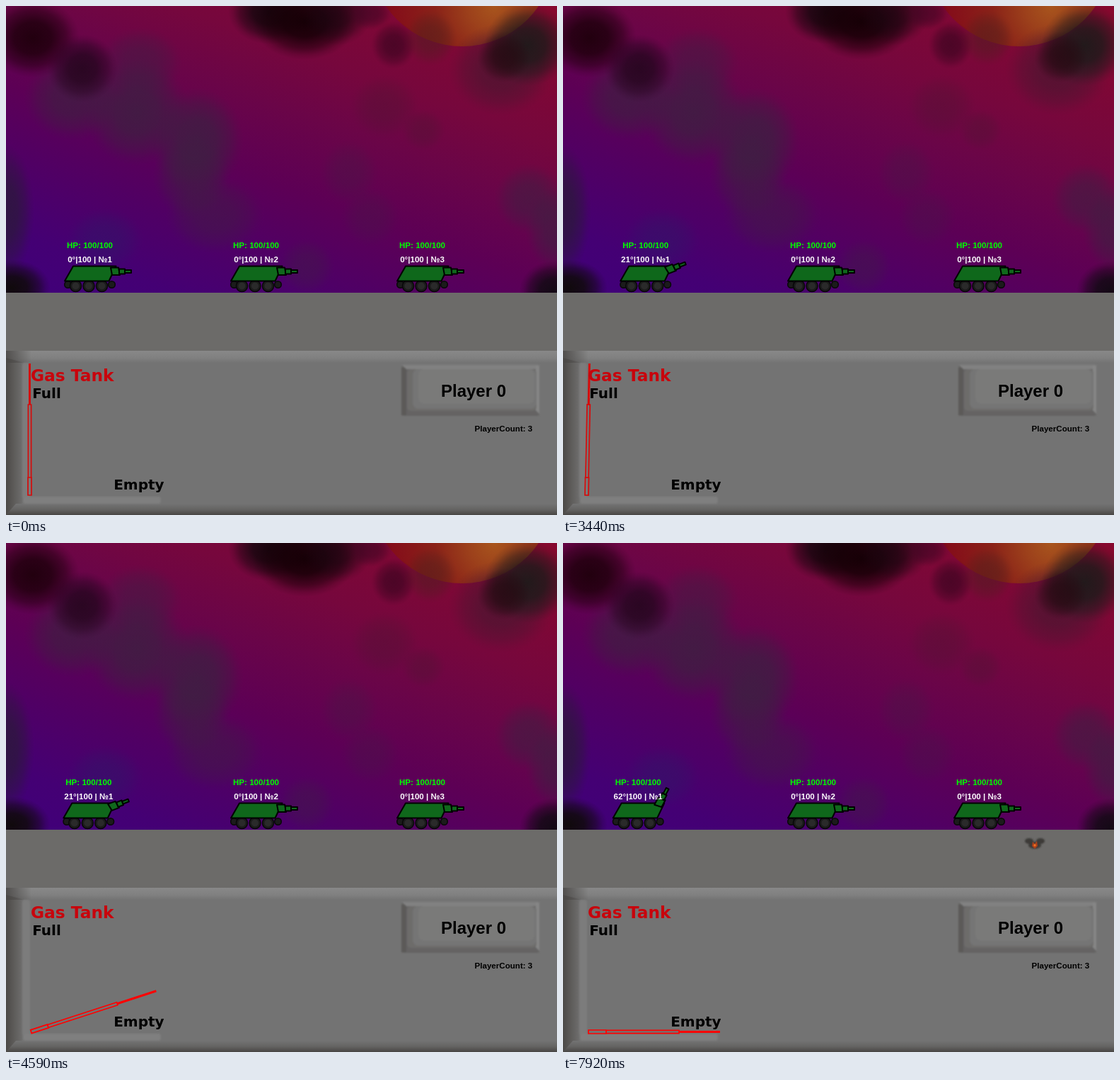
An HTML page with a canvas that plays this animation: 779 px wide and 719 px high, repeating every 8000 ms.

```html
<!DOCTYPE html>
<html lang="en">
<head>
<meta charset="utf-8">
<title>Tank duel</title>
<style>
  html, body { margin: 0; width: 100%; height: 100%; overflow: hidden; background: #6c6b69; }
  canvas, svg { position: absolute; left: 0; top: 0; display: block; }
  text { font: bold 11.6px "Liberation Sans", Arial, sans-serif; }
  .mid { text-anchor: middle; }
  .hp { fill: #0f0; }
  .info { fill: #fff; }
  .gauge { font: bold 20px "DejaVu Sans", sans-serif; }
  .hull { fill: #0f681b; stroke: #000; stroke-width: 2; stroke-linejoin: round; }
</style>
</head>
<body>
<canvas id="sky" width="779" height="405"></canvas>
<svg width="779" height="719" viewBox="0 0 779 719">
  <defs>
    <linearGradient id="left">
      <stop offset="0" stop-color="#4b4947"/><stop offset=".35" stop-color="#5a5856"/>
      <stop offset=".75" stop-color="#696867"/><stop offset="1" stop-color="#737373"/>
    </linearGradient>
    <linearGradient id="top" x2="0" y2="1">
      <stop offset="0" stop-color="#888"/><stop offset=".6" stop-color="#808080"/>
      <stop offset="1" stop-color="#737373"/>
    </linearGradient>
    <linearGradient id="bottom" x2="0" y2="1">
      <stop offset="0" stop-color="#737373"/><stop offset=".5" stop-color="#656463"/>
      <stop offset="1" stop-color="#484644"/>
    </linearGradient>
    <linearGradient id="corner" x2="1">
      <stop offset="0" stop-color="#4b4947" stop-opacity=".9"/>
      <stop offset="1" stop-color="#4b4947" stop-opacity="0"/>
    </linearGradient>
    <filter id="soft" x="-20%" y="-20%" width="140%" height="140%"><feGaussianBlur stdDeviation="1.2"/></filter>

    <g id="chassis">
      <g fill="#1b1b1b" stroke="#080808" stroke-width="1.5">
        <circle cx="87.5" cy="393.5" r="4.8"/><circle cx="149.5" cy="393.5" r="4.8"/>
        <circle cx="98.5" cy="395.5" r="8"/><circle cx="117" cy="395.5" r="8"/><circle cx="135.5" cy="395.5" r="8"/>
      </g>
      <g fill="#2a2a2a">
        <circle cx="98.5" cy="395.5" r="5"/><circle cx="117" cy="395.5" r="5"/><circle cx="135.5" cy="395.5" r="5"/>
      </g>
      <path class="hull" d="M95 367.5H155.5L145.5 388.5H83Z"/>
    </g>
    <g id="barrel" class="hull">
      <path d="M3-5.5H14L16 5H5Z"/>
      <path d="M15-3.5H23V3.5H15Z"/>
      <path d="M23-2H32V2H23Z"/>
    </g>
  </defs>

  <path fill="#6c6b69" d="M0 405H779V488H0Z"/>
  <path fill="#737373" d="M0 487H779V719H0Z"/>
  <path fill="url(#top)" d="M0 487H779V504H0Z"/>
  <path fill="url(#left)" d="M0 497L26 504V700L0 719Z"/>
  <path fill="url(#corner)" d="M0 487H36V504H0Z"/>
  <path fill="url(#bottom)" d="M14 703H779V719H0Z"/>
  <g filter="url(#soft)">
    <rect x="23" y="504" width="11" height="192" rx="4" fill="#7b7b7b"/>
    <rect x="24" y="693" width="195" height="10" rx="4" fill="#7f7f7f"/>
    <rect x="559" y="508" width="195" height="71" rx="3" fill="#656463"/>
    <path fill="#5b5a58" d="M559 511H566V578H559Z"/>
    <path fill="#818181" d="M560 507H754V513H566Z"/>
    <path fill="#858585" d="M749 509H754V576L749 571Z"/>
    <rect x="567" y="513" width="183" height="59" rx="6" fill="#6d6c6a"/>
    <rect x="575" y="513" width="175" height="56" rx="8" fill="#757574"/>
    <rect x="583" y="513" width="164" height="49" rx="8" fill="#7a7a79"/>
  </g>

  <text class="mid" x="661" y="552" style="font-size:24px">Player 0</text>
  <text x="662.5" y="601">PlayerCount: 3</text>
  <g id="needle">
    <path d="M-3-187H0V-129H-3Z" stroke="none"/>
    <path fill="none" stroke-width="1.7" d="M-3.6-129H.6V-26H-3.6ZM-4-26H1V-1H-4Z"/>
  </g>
  <text class="gauge" x="35" y="530" fill="#c8040c" style="font-size:23.3px">Gas Tank</text>
  <text class="gauge" x="37.2" y="554">Full</text>
  <text class="gauge" x="152.2" y="683">Empty</text>

  <g id="tanks"></g>

  <g id="shot">
    <circle r="2.7" fill="#f04a10"/><circle r="1.5" fill="#ffc020"/>
  </g>
  <g id="blast">
    <g filter="url(#soft)" fill="#3c3a38">
      <ellipse cx="-8" cy="-3" rx="6" ry="4"/><ellipse cx="8" cy="-3" rx="6" ry="4"/>
      <ellipse cy="3" rx="9" ry="5"/>
    </g>
    <path fill="#a8401c" d="M-3-2L0 1 3-3 4 4 0 8-4 4Z"/>
    <circle cy="3" r="1.7" fill="#f07020"/>
  </g>
</svg>

<script>
const LOOP = 8000, TICK = 77.2, START = 492;
const $ = id => document.getElementById(id);

// Sky
const ctx = $("sky").getContext("2d");

function ramp(gradient, stops) {
  for (const [at, color] of stops) gradient.addColorStop(at, color);
  return gradient;
}

function cloud(x, y, rx, ry, color, strength = 1) {
  const hex = a => color + Math.round(a * strength * 255).toString(16).padStart(2, "0");
  ctx.save();
  ctx.translate(x, y);
  ctx.scale(rx, ry);
  ctx.fillStyle = ramp(ctx.createRadialGradient(0, 0, 0, 0, 0, 1),
    [[0, hex(1)], [.4, hex(.88)], [.7, hex(.5)], [.88, hex(.15)], [1, hex(0)]]);
  ctx.fillRect(-1, -1, 2, 2);
  ctx.restore();
}

function paintSky() {
  ctx.fillStyle = ramp(ctx.createLinearGradient(0, 404, 220, -188), [
    [0, "#40007a"], [.13, "#440074"], [.29, "#500064"], [.44, "#5d0055"],
    [.6, "#6a0548"], [.73, "#76073d"], [1, "#86082e"]]);
  ctx.fillRect(0, 0, 779, 405);

  ctx.fillStyle = ramp(ctx.createRadialGradient(690, 0, 0, 690, 0, 150),
    [[0, "#a8551d"], [.25, "#9c401b"], [.55, "#8a2218"], [1, "#840c1a"]]);
  ctx.beginPath();
  ctx.arc(645, -74, 131, 0, 7);
  ctx.fill();

  const haze = "#3e1f42", soot = "#1a0610", dust = "#4a1630";
  cloud(95, 130, 70, 60, haze, .75);
  cloud(185, 150, 75, 75, haze, .85);
  cloud(270, 190, 66, 75, haze, .85);
  cloud(262, 240, 55, 60, haze, .6);
  cloud(295, 295, 70, 55, haze, .5);
  cloud(190, 80, 60, 50, haze, .5);
  cloud(38, 45, 66, 56, "#22000f");
  cloud(108, 88, 50, 48, "#280620", .95);
  cloud(372, 8, 58, 46, soot);
  cloud(422, 22, 74, 54, "#160006");
  cloud(468, 10, 50, 46, soot, .7);
  cloud(514, 10, 32, 24, "#420624", .7);
  cloud(548, 55, 32, 34, "#400522", .8);
  cloud(600, 45, 38, 40, "#4a201c", .5);
  cloud(700, 90, 75, 65, dust, .75);
  cloud(738, 55, 62, 58, "#1e1a1a", .95);
  cloud(704, 72, 38, 36, "#260a12", .8);
  cloud(590, 175, 32, 30, dust, .35);
  cloud(535, 142, 50, 46, dust, .35);
  cloud(485, 235, 42, 46, haze, .3);
  cloud(515, 298, 42, 42, haze, .28);
  cloud(740, 272, 50, 50, haze, .6);
  cloud(779, 315, 45, 60, haze, .7);
  cloud(425, 368, 40, 40, haze, .4);
  cloud(140, 330, 55, 45, "#2a1c66", .4);
  cloud(0, 290, 40, 95, "#2a1a38", .8);
  cloud(8, 398, 55, 40, "#100a0c");
  cloud(774, 402, 48, 42, "#100a12", .95);
}

// Tanks stand 235 px apart; each one is drawn at the first position and shifted.
function addTank(index) {
  $("tanks").insertAdjacentHTML("beforeend", `<g transform="translate(${index * 235})">
    <use href="#chassis"/>
    <use href="#barrel" transform="translate(145 375)"/>
    <text class="mid hp" x="118.5" y="342">HP: 100/100</text>
    <text class="mid info" x="118.5" y="362">0°|100 | №${index + 1}</text></g>`);
}

// Linear interpolation through [tick, value] keys.
function along(keys, k) {
  if (k <= keys[0][0]) return keys[0][1];
  for (let i = 1; i < keys.length; i++) {
    const [a, from] = keys[i - 1], [b, to] = keys[i];
    if (k <= b) return from + (to - from) * (k - a) / (b - a);
  }
  return keys[keys.length - 1][1];
}

const aimKeys = [[13, 0], [21, 31], [24, 31], [25, 27], [31, 3], [35, 20], [36, 21],
  [59, 21], [63, 38], [65, 38], [71, 62]];
const driveKeys = [[37, 0], [38, -1.8], [44, -22.5], [46, -29.7], [53, -1.7], [54, 0], [57, -12.3]];
const fuelKeys = [[37, 0], [38, 1.2], [44, 28], [53, 72], [57, 90]];

function shotAt(k) {
  if (k === 78 || k === 79) return [210.5 + 91 * (k - 78), 227.5 - 150.5 * (k - 78)];
  const j = k - 85;
  return j >= 0 && j < 5 ? [606 + 19 * j - 1.1 * j * j, 6 + 68 * j + 6 * j * j] : null;
}

paintSky();
for (let i = 0; i < 3; i++) addTank(i);
const player = $("tanks").firstElementChild;
const barrel = player.querySelectorAll("use")[1];
const info = player.querySelector(".info");

function draw(k) {
  const aim = Math.round(along(aimKeys, k));
  player.setAttribute("transform", `translate(${along(driveKeys, k)})`);
  barrel.setAttribute("transform", `translate(145 375) rotate(${-aim})`);
  info.textContent = `${aim}°|100 | №1`;

  const fuel = along(fuelKeys, k);
  const red = `hsl(0 ${90 + Math.min(10, fuel / 2)}% ${44 + Math.min(6, fuel / 4)}%)`;
  const needle = $("needle");
  needle.setAttribute("transform", `translate(35 692) rotate(${fuel})`);
  needle.setAttribute("fill", red);
  needle.setAttribute("stroke", red);

  const shot = shotAt(k);
  $("shot").setAttribute("visibility", shot ? "visible" : "hidden");
  if (shot) $("shot").setAttribute("transform", `translate(${shot})`);

  $("blast").setAttribute("visibility", k >= 95 ? "visible" : "hidden");
  $("blast").setAttribute("transform", `translate(667 424) scale(${k > 95 ? 1 : .65})`);
}

let shown;
function frame() {
  const k = Math.floor((performance.now() % LOOP - START) / TICK);
  if (k !== shown) draw(shown = k);
  requestAnimationFrame(frame);
}
frame();
</script>
</body>
</html>
```
